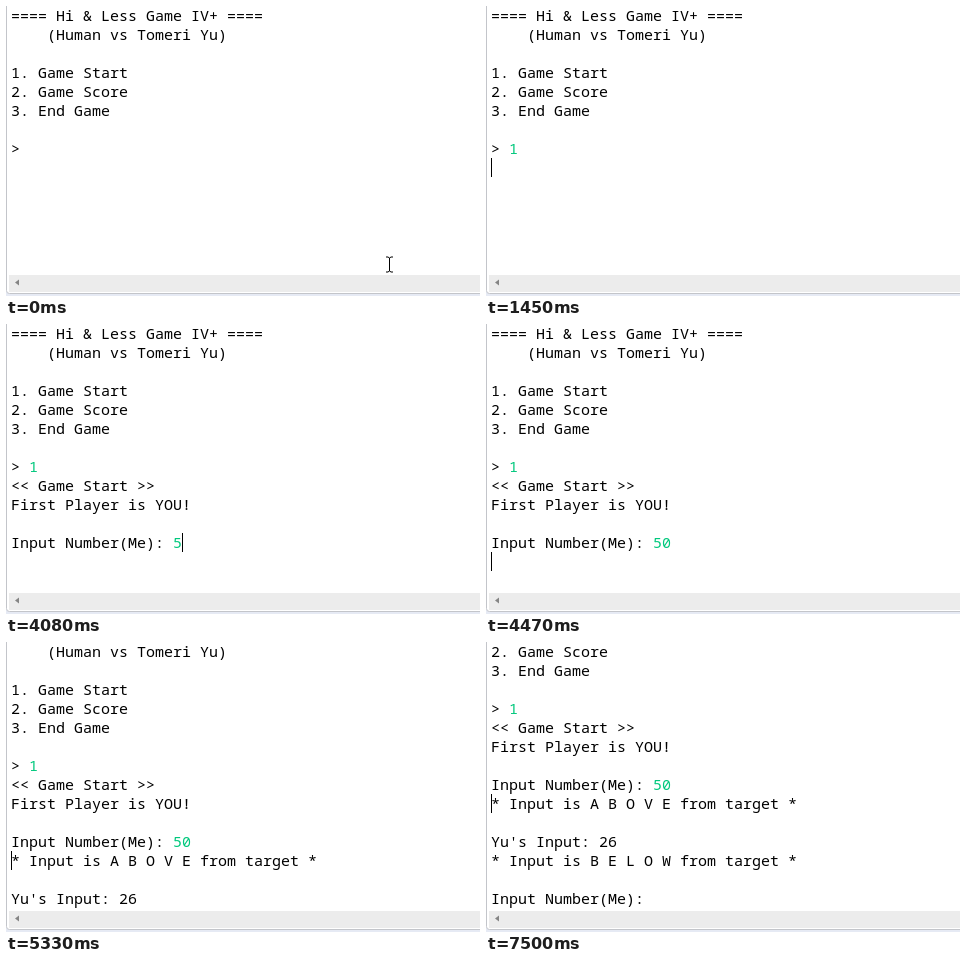
These frames come from a looping animation (474x290 px, 8 s). An HTML page:

```html
<!DOCTYPE html>
<html lang="en">
<head>
<meta charset="utf-8">
<title>Console game</title>
<style>
  html, body { margin: 0; width: 100%; height: 100%; overflow: hidden; background: #fff; }
  svg { display: block; width: 474px; height: 290px; }
  text { font: 15px "Noto Sans Mono", "DejaVu Sans Mono", monospace; white-space: pre; fill: #000; }
  .typed { fill: #00c87d; }
</style>
</head>
<body>
<svg viewBox="0 0 474 290">
  <rect width="474" height="290" fill="#e6eaf4"/>
  <path d="M.5 -1V284.5Q.5 287.5 3.5 287.5H480V-1Z" fill="#fff" stroke="#c3c5ca"/>
  <g id="lines"></g>
  <rect x="3" y="269" width="471" height="17" fill="#ececec"/>
  <path d="M13 273.5V279.5L9 276.5Z" fill="#858585"/>
  <rect id="caret" width="1" height="19"/>
  <path id="pointer" d="M-3.5 -7.5H-1.5L0 -6.5L1.5 -7.5H3.5M0 -6.5V6.5M-3.5 7.5H-1.5L0 6.5L1.5 7.5H3.5"
        fill="none" stroke="#000"/>
  <circle id="halo" cx="158" cy="138" r="12" fill="#ff0" fill-opacity=".5"/>
</svg>
<script>
const LOOP = 8000, ROW = 19, COL = 9, LEFT = 5, BASE = 15;
const $ = id => document.getElementById(id);

// [row, time it appears, text, typed part as pairs of time and character]
const script = [
  [0, 0, "==== Hi & Less Game IV+ ===="],
  [1, 0, "    (Human vs Tomeri Yu)"],
  [3, 0, "1. Game Start"],
  [4, 0, "2. Game Score"],
  [5, 0, "3. End Game"],
  [7, 0, "> ", [[1220, "1"]]],
  [8, 1530, "<< Game Start >>"],
  [9, 1530, "First Player is YOU!"],
  [11, 1530, "Input Number(Me): ", [[4080, "5"], [4230, "0"]]],
  [12, 4480, "* Input is A B O V E from target *"],
  [14, 5330, "Yu's Input: 26"],
  [15, 5330, "* Input is B E L O W from target *"],
  [17, 5330, "Input Number(Me): "]
];

// Caret: [time, row, column]; without a place it is hidden
const carets = [
  [0], [450, 7, 2], [990], [1220, 7, 3],
  [1450, 8, 0], [2080], [2610, 8, 0], [3070], [3620, 8, 0],
  [4080, 11, 19], [4230, 11, 20], [4400, 12, 0], [5100],
  [5330, 12, 0], [5940], [6490, 12, 0], [6950], [7500, 12, 0]
];
const scrolls = [[0, 0], [4550, 1], [5430, 4]];
const moves = [130, 200, 280, 360, 450];

function add(parent, tag, attrs) {
  const node = document.createElementNS("http://www.w3.org/2000/svg", tag);
  for (const key in attrs) node.setAttribute(key, attrs[key]);
  return parent.appendChild(node);
}

const lines = script.map(([row, start, content, keys = []]) => {
  const text = add($("lines"), "text", { x: LEFT, y: row * ROW + BASE });
  text.textContent = content;
  const typed = add(text, "tspan", { class: "typed" });
  return { start, keys, text, typed };
});

const current = (list, t) => list.filter(item => item[0] <= t).pop();
const show = (node, on) => node.setAttribute("visibility", on ? "visible" : "hidden");
const place = (node, x, y) => node.setAttribute("transform", `translate(${x} ${y})`);

function render(t) {
  const [, top] = current(scrolls, t);
  place($("lines"), 0, -top * ROW);
  for (const { start, keys, text, typed } of lines) {
    show(text, t >= start);
    typed.textContent = keys.filter(k => t >= k[0]).map(k => k[1]).join("");
  }

  const [, row, col] = current(carets, t);
  show($("caret"), row !== undefined);
  if (row !== undefined) place($("caret"), LEFT + col * COL, (row - top) * ROW);

  const u = moves.filter(m => t >= m).length / moves.length;
  const ease = u * u * (3 - 2 * u);
  place($("pointer"), Math.round(383 - 223 * ease) + .5, Math.round(258 - 120 * ease) + .5);
  show($("pointer"), t < 1220);
  show($("halo"), t >= 450 && t < 670);
}

const begin = performance.now();
function tick() {
  render((performance.now() - begin) % LOOP);
  requestAnimationFrame(tick);
}
tick();
</script>
</body>
</html>
```
